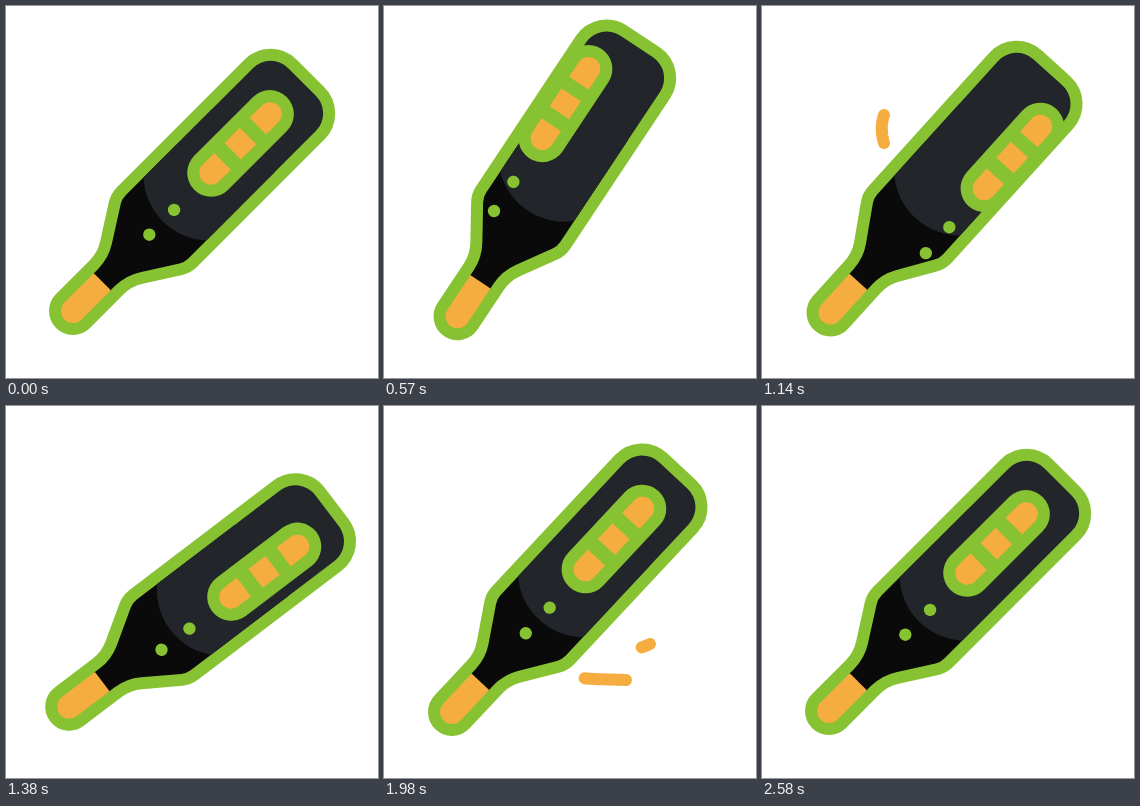
An HTML page with a canvas for the animation above (3.6 s loop, 372 by 372 pixels).

```html
<!DOCTYPE html>
<html>
<head>
<meta charset="utf-8">
<style>
html, body { margin: 0; width: 100%; height: 100%; overflow: hidden; background: #fff; }
canvas { display: block; }
</style>
</head>
<body>
<canvas id="stage" width="372" height="372"></canvas>
<script>
const ctx = document.getElementById('stage').getContext('2d');
const GREEN = '#87c232', ORANGE = '#f6ad40', GLASS = '#22262b', LIQUID = '#0a0a0a';
const LOOP = 3600, STEP = 30;

// [time, value] keys
const SWING = [[0, 0], [850, 16], [1390, -8], [1850, 4], [2190, -2], [2560, 0]];
const SHIFT = [[0, 0], [750, -34.3], [840, -34.3], [1165, 34], [1600, -13.6], [1950, 0]];

const TRAILS = [
  { curve: [122, 137, 119, 127, 119, 118, 122, 109], head: [1050, 1140], tail: [1140, 1290] },
  { curve: [152, 193, 170, 222, 215, 262, 266, 238], head: [1440, 1665], tail: [1640, 2000] },
  { curve: [158, 245, 175, 277, 200, 272, 242, 274], head: [1540, 1740], tail: [1740, 2130] }
];

// Outline of the thermometer: corner x, y, radius; right side, then mirrored
const RIGHT = [[44.5, -281.5, 25], [44.5, -71, 18], [12, -20, 51], [12, 54.4, 12]];
const CORNERS = [...RIGHT, ...RIGHT.map(([x, y, r]) => [-x, y, r]).reverse()];
const body = new Path2D();
body.moveTo(0, -281.5);
CORNERS.forEach(([x, y, r], i) => {
  const [nx, ny] = CORNERS[i + 1] || [0, -281.5];
  body.arcTo(x, y, nx, ny, r);
});
body.closePath();

const ramp = (t, [from, to]) => Math.min(1, Math.max(0, (t - from) / (to - from)));
const ease = p => p / 2 + (1 - Math.cos(Math.PI * p)) / 4;

function track(keys, t) {
  const i = keys.findIndex(k => k[0] > t);
  if (i < 0) return keys[keys.length - 1][1];
  const [t0, v0] = keys[i - 1], [t1, v1] = keys[i];
  return v0 + (v1 - v0) * ease((t - t0) / (t1 - t0));
}

function box(color, x, y, w, h, radii) {
  ctx.fillStyle = color;
  ctx.beginPath();
  ctx.roundRect(x, y, w, h, radii);
  ctx.fill();
}

function disc(color, x, y, r) {
  ctx.fillStyle = color;
  ctx.beginPath();
  ctx.arc(x, y, r, 0, 7);
  ctx.fill();
}

function thermometer(angle, shift) {
  ctx.save();
  ctx.translate(97, 275);
  ctx.rotate((45 - angle) * Math.PI / 180);
  ctx.lineJoin = 'round';
  ctx.lineWidth = 24;
  ctx.strokeStyle = GREEN;
  ctx.stroke(body);

  ctx.save();
  ctx.clip(body);
  box(LIQUID, -60, -150, 120, 152, 0);
  disc(GLASS, 0, -150.5, 66);
  box(GLASS, -60, -300, 120, 149.5, 0);
  box(ORANGE, -60, 1, 120, 70, 0);
  ctx.restore();

  ctx.translate(shift, 0);
  box(GREEN, -24, -260, 48, 131, 24);
  box(ORANGE, -11.7, -248, 23.4, 29, [11.7, 11.7, 0, 0]);
  box(ORANGE, -11.7, -205, 23.4, 21.5, 0);
  box(ORANGE, -11.7, -169, 23.4, 28, [0, 0, 11.7, 11.7]);
  disc(GREEN, 0, -100.5, 6.2);
  disc(GREEN, 0, -65.5, 6.2);
  ctx.restore();
}

function trail({ curve: c, head, tail }, t) {
  const from = ramp(t, tail), to = ramp(t, head);
  if (to <= from) return;
  const at = (p, k) => {
    const q = 1 - p;
    return q * q * q * c[k] + 3 * q * q * p * c[k + 2] + 3 * q * p * p * c[k + 4] + p * p * p * c[k + 6];
  };
  ctx.beginPath();
  for (let i = 0; i <= 24; i++) {
    const p = from + (to - from) * i / 24;
    ctx.lineTo(at(p, 0), at(p, 1));
  }
  ctx.lineCap = ctx.lineJoin = 'round';
  ctx.lineWidth = 12;
  ctx.strokeStyle = ORANGE;
  ctx.stroke();
}

function draw(now) {
  const t = Math.floor(now % LOOP / STEP) * STEP;
  ctx.fillStyle = '#fff';
  ctx.fillRect(0, 0, 372, 372);
  thermometer(track(SWING, t), track(SHIFT, t));
  TRAILS.forEach(s => trail(s, t));
}

let start;
function frame(now) {
  start ??= now;
  draw(now - start);
  requestAnimationFrame(frame);
}
draw(0);
requestAnimationFrame(frame);
</script>
</body>
</html>
```
